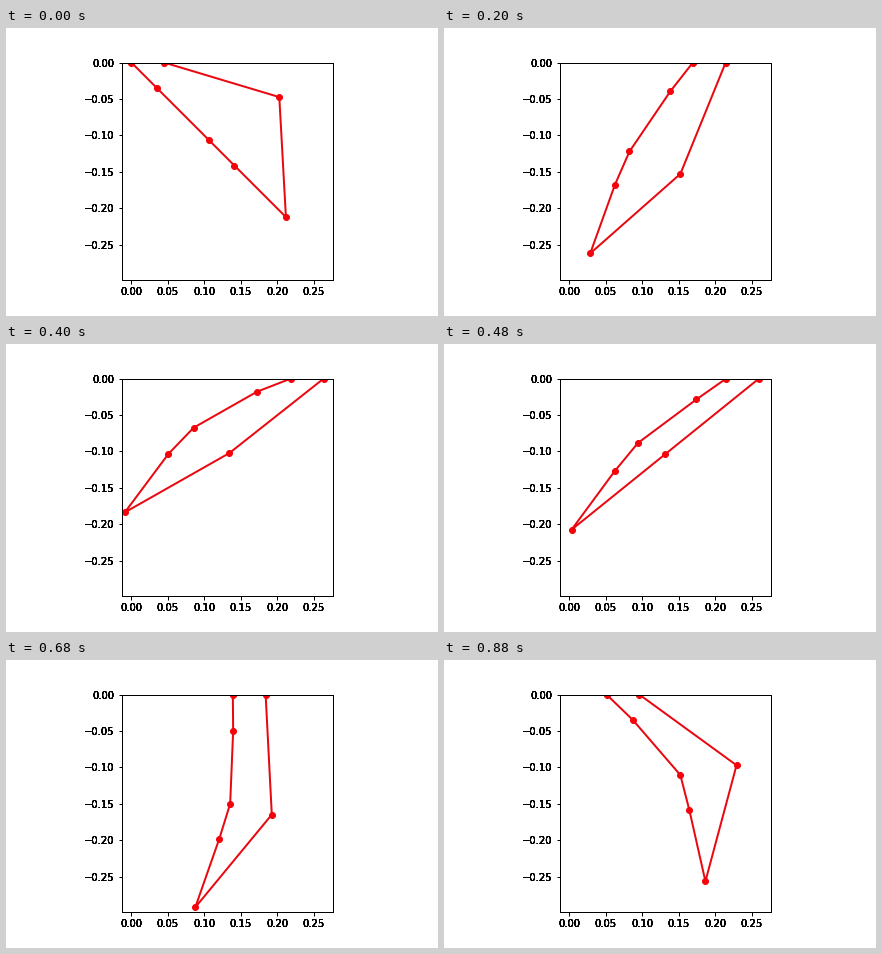
Recreate the animation shown at these times as a matplotlib script. Size 432x288 px, loop 920 ms.

```python
import numpy as np
import matplotlib.pyplot as plt
from matplotlib.animation import FuncAnimation

FRAMES, INTERVAL = 23, 40
TURN = 10                       # frame where the stroke reverses
LINKS = np.array([0.05, 0.1, 0.05, 0.1])
SHIN = 0.165                    # both bars of the return leg
BASE = 0.045                    # distance between the sliding hips

# Link angles from straight down, in degrees, hip to foot
START = 45
PEAK = np.array([-68.8, -60.4, -43.9, -36.7])
END = np.array([46, 40.8, 14.4, 12.7])

# The further down the chain, the softer the outward swing
OUT_SOFT = 0.2 + 0.24 * np.arange(4)
BACK_POWER = np.array([1, 1.1, 1.45, 1.7])
BACK_SOFT = np.array([0.5, 0.8, 0, 1])


def soften(x, amount):
    """Blend a linear ramp with a smoothstep."""
    return x + amount * (x * x * (3 - 2 * x) - x)


def stroke(n, start, peak, end, out_power, out_soft, back_power, back_soft):
    """Ease out to the peak, then back to the end."""
    if n <= TURN:
        ramp = 1 - (1 - n / TURN) ** out_power
        return start + (peak - start) * soften(ramp, out_soft)
    ramp = ((n - TURN) / (FRAMES - 1 - TURN)) ** back_power
    return peak + (end - peak) * soften(ramp, back_soft)


def joints(n):
    hip = stroke(n, 0, 0.219, 0.051, 1.7, 1, 1.35, 1)
    a = np.radians(stroke(n, START, PEAK, END, 1.8, OUT_SOFT,
                          BACK_POWER, BACK_SOFT))
    steps = np.column_stack([np.sin(a), -np.cos(a)]) * LINKS[:, None]
    chain = np.vstack([[hip, 0], [hip, 0] + np.cumsum(steps, axis=0)])

    # The knee closes the loop between foot and second hip
    foot, end = chain[-1], np.array([hip + BASE, 0])
    dx, dy = end - foot
    dist = np.hypot(dx, dy)
    bulge = np.sqrt(max(0, SHIN ** 2 - dist ** 2 / 4))
    knee = (foot + end) / 2 + bulge * np.array([dy, -dx]) / dist
    return np.vstack([chain, knee, end])


fig = plt.figure(figsize=(6, 4), dpi=72, facecolor="white")
ax = fig.add_axes([0.125, 0.125, 0.775, 0.755])
ax.set_aspect("equal")
ax.set_xlim(-0.0132, 0.2768)
ax.set_ylim(-0.2985, 0)
ticks = np.arange(6) * 0.05
ax.set_xticks(ticks)
ax.set_yticks(-ticks)
ax.tick_params(labelbottom=False, labelleft=False, width=1)
for spine in ax.spines.values():
    spine.set_linewidth(1)


def label(text, xy, coords, offset, **align):
    # Overprinting gives the heavy lettering
    for _ in range(7):
        ax.annotate(text, xy, xycoords=coords, xytext=offset,
                    textcoords="offset points", fontsize=10,
                    family="DejaVu Sans", **align)


for v in ticks:
    label(f"{v:.2f}", (v, 0), ax.get_xaxis_transform(), (0, -7),
          ha="center", va="top")
    sign = "\u2212" if v else ""
    label(f"{sign}{v:.2f}", (0, -v), ax.get_yaxis_transform(), (-7, 0),
          ha="right", va="center_baseline")

line, = ax.plot([], [], "o-", color="#ea0810", linewidth=2, markersize=6,
                markerfacecolor="#f4040a", markeredgecolor="#f4040a")


def update(n):
    line.set_data(*joints(n).T)
    return line,


anim = FuncAnimation(fig, update, frames=FRAMES, interval=INTERVAL,
                     repeat=True, repeat_delay=0)
plt.show()
```
